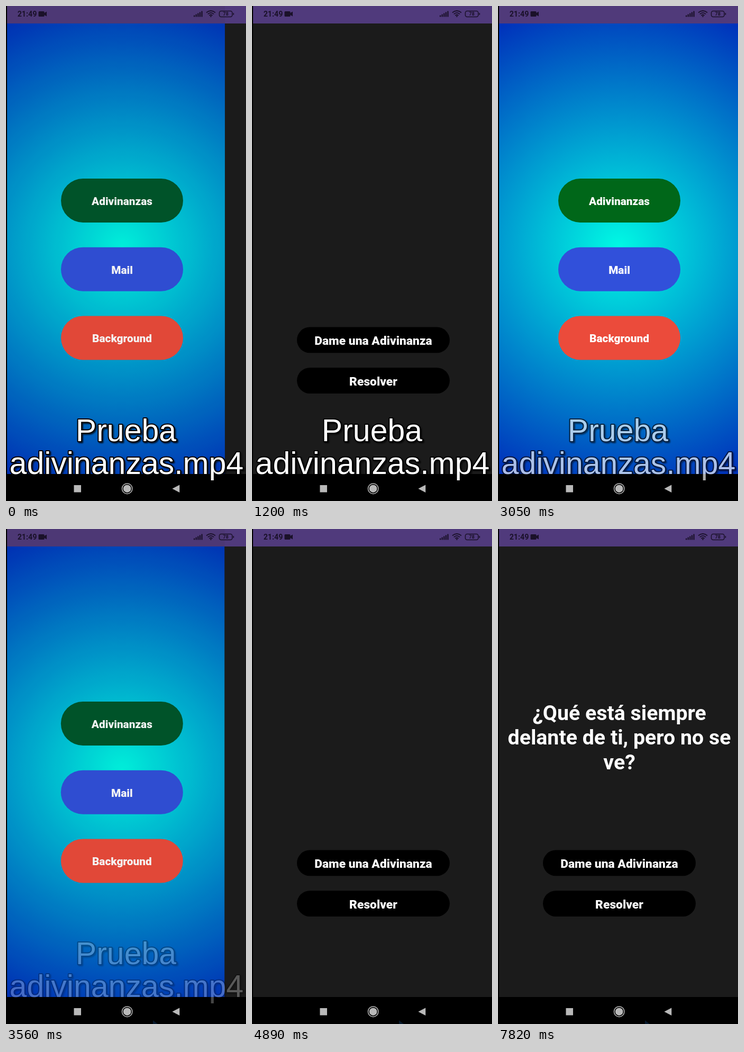
An HTML page that plays this animation: 454x935 px, repeating every 8 s.

```html
<!DOCTYPE html>
<html lang="es">
<head>
<meta charset="utf-8">
<title>Adivinanzas</title>
<style>
  html, body { margin: 0; width: 100%; height: 100%; overflow: hidden; background: #000; }
  svg { display: block; width: 454px; height: 935px; }
  text { font-family: Roboto, "Noto Sans", sans-serif; font-weight: 700; fill: #fff; text-anchor: middle; }
  .menu text { font-size: 20.8px; font-weight: 900; }
  .action text { font-size: 22.8px; font-weight: 900; }
  #riddle text { font-size: 39.3px; }
  #caption { filter: drop-shadow(2px 2px 1px rgba(0, 0, 0, .75)); }
  #caption text {
    font: 400 59px "Liberation Sans", Arial, sans-serif;
    stroke: #000; stroke-width: 4px; stroke-linejoin: round; paint-order: stroke;
  }
  #status text { font-size: 14.2px; fill: #1a1129; }
  #status .level { font-size: 9px; }
</style>
</head>
<body>
<svg viewBox="0 0 454 935">
  <defs>
    <radialGradient id="glow" gradientUnits="userSpaceOnUse" cx="229" cy="456" r="475">
      <stop offset="0" stop-color="#00f9e4"/>
      <stop offset="1" stop-color="#0032bb"/>
    </radialGradient>
    <clipPath id="screen"><rect x="2" width="452" height="935"/></clipPath>
  </defs>
  <rect width="454" height="935"/>

  <g clip-path="url(#screen)">
    <g id="home">
      <rect x="2" width="455" height="33" fill="#503a7a"/>
      <rect x="2" y="33" width="455" height="851" fill="url(#glow)"/>
      <g id="menu" class="menu"></g>
    </g>
    <rect id="dim" width="454" height="884"/>
    <g id="riddles">
      <rect x="2" width="455" height="33" fill="#503a7c"/>
      <rect x="2" y="33" width="455" height="851" fill="#1b1b1b"/>
      <g id="riddle">
        <text x="229.5" y="361.3">¿Qué está siempre</text>
        <text x="229.5" y="407.4">delante de ti, pero no se</text>
        <text x="229.5" y="453.5">ve?</text>
      </g>
      <g id="actions" class="action"></g>
    </g>
  </g>

  <g id="status" fill="#1a1129">
    <text x="40" y="20">21:49</text>
    <rect x="61.5" y="10" width="11" height="10" rx="1.5"/>
    <path d="M71 14 77 10.5V19.5L71 16Z"/>
    <g id="bars"></g>
    <g fill="none" stroke="#1a1129" stroke-width="1.7">
      <path d="M379 12.5Q387.5 5.5 396 12.5M381.8 15.3Q387.5 10.5 393.2 15.3M384.5 18Q387.5 15.5 390.5 18"/>
      <rect x="403.5" y="9.5" width="24.5" height="11" rx="3.5" stroke-width="1.5"/>
    </g>
    <circle cx="387.5" cy="19.8" r="1.3"/>
    <rect x="429.5" y="13" width="1.7" height="4" rx=".8"/>
    <text class="level" x="415.7" y="18.3">78</text>
  </g>

  <rect y="884" width="454" height="51"/>
  <g fill="#b9b9b9">
    <rect x="128.5" y="905" width="13.5" height="13.5"/>
    <circle cx="229.2" cy="911.7" r="9.7" fill="none" stroke="#b9b9b9" stroke-width="1.5"/>
    <circle cx="229.2" cy="911.7" r="7.3"/>
    <path d="M314.5 911.7 328.3 904.5V919Z"/>
  </g>
  <path id="pointer" d="M278 928 287 935H278Z" fill="#06182c"/>

  <g id="caption">
    <text x="227" y="822">Prueba</text>
    <text x="228" y="884">adivinanzas.mp4</text>
  </g>
</svg>
<script>
const LOOP = 8000, TICK = 63.5, WIDTH = 452;
const $ = id => document.getElementById(id);
const clamp = v => Math.max(0, Math.min(1, v));
const within = (t, from, to) => t >= from && t < to;

function add(parent, tag, attrs, label = '') {
  const node = document.createElementNS('http://www.w3.org/2000/svg', tag);
  for (const name in attrs) node.setAttribute(name, attrs[name]);
  node.textContent = label;
  parent.append(node);
  return node;
}

function addButton(parent, label, fill, y, width, height, baseline) {
  const pill = add(parent, 'rect', { x: 229.5 - width / 2, y, width, height, rx: height / 2, fill });
  add(parent, 'text', { x: 229.5, y: baseline }, label);
  return pill;
}

const [openButton] = [['Adivinanzas', '#006719'], ['Mail', '#3150da'], ['Background', '#eb4b3b']]
  .map(([label, fill], i) => addButton($('menu'), label, fill, 326 + i * 129.7, 231, 83, 376.3 + i * 129.5));
const [askButton] = ['Dame una Adivinanza', 'Resolver']
  .map((label, i) => addButton($('actions'), label, '#000', 606.5 + i * 76.7, 289, 48.8, 640.3 + i * 76.6));
for (let i = 0; i < 5; i++) {
  const height = 3 + i * 2;
  add($('bars'), 'rect', { x: 355 + i * 3.6, y: 20.5 - height, width: 2.3, height, rx: .6 });
}

// Critically damped spring from 0 to 1, snapped once it has settled.
function spring(elapsed, rate) {
  const k = Math.max(0, elapsed) * rate;
  const value = 1 - (1 + k) * Math.exp(-k);
  return value > .995 ? 1 : value;
}

function pageProgress(t) {
  if (t < 2625) return spring(t + 27.7, .01783);
  if (t < 3528) return 1 - spring(t - 2625, .02);
  return spring(t - 3528, .01783);
}

function render(time) {
  const t = Math.floor((time + 14) / TICK) * TICK;
  const p = pageProgress(t);
  $('home').setAttribute('transform', `translate(${-WIDTH / 4 * p})`);
  $('riddles').setAttribute('transform', `translate(${WIDTH * (1 - p)})`);
  $('dim').setAttribute('opacity', p / 2);
  $('riddle').style.display = within(t, 2270, 3500) || t >= 5700 ? '' : 'none';
  $('pointer').style.display = t >= 3480 ? '' : 'none';
  $('caption').style.opacity = clamp((3895 - t) / 1255);

  const opening = t < 100 || within(t, 3480, 3650);
  openButton.setAttribute('fill', opening ? '#00572b' : '#006719');
  const asking = within(t, 2200, 2450) || within(t, 5640, 5960);
  askButton.setAttribute('fill', asking ? '#090412' : '#000');
}

const start = performance.now();
function loop() {
  render((performance.now() - start) % LOOP);
  requestAnimationFrame(loop);
}
loop();
</script>
</body>
</html>
```
